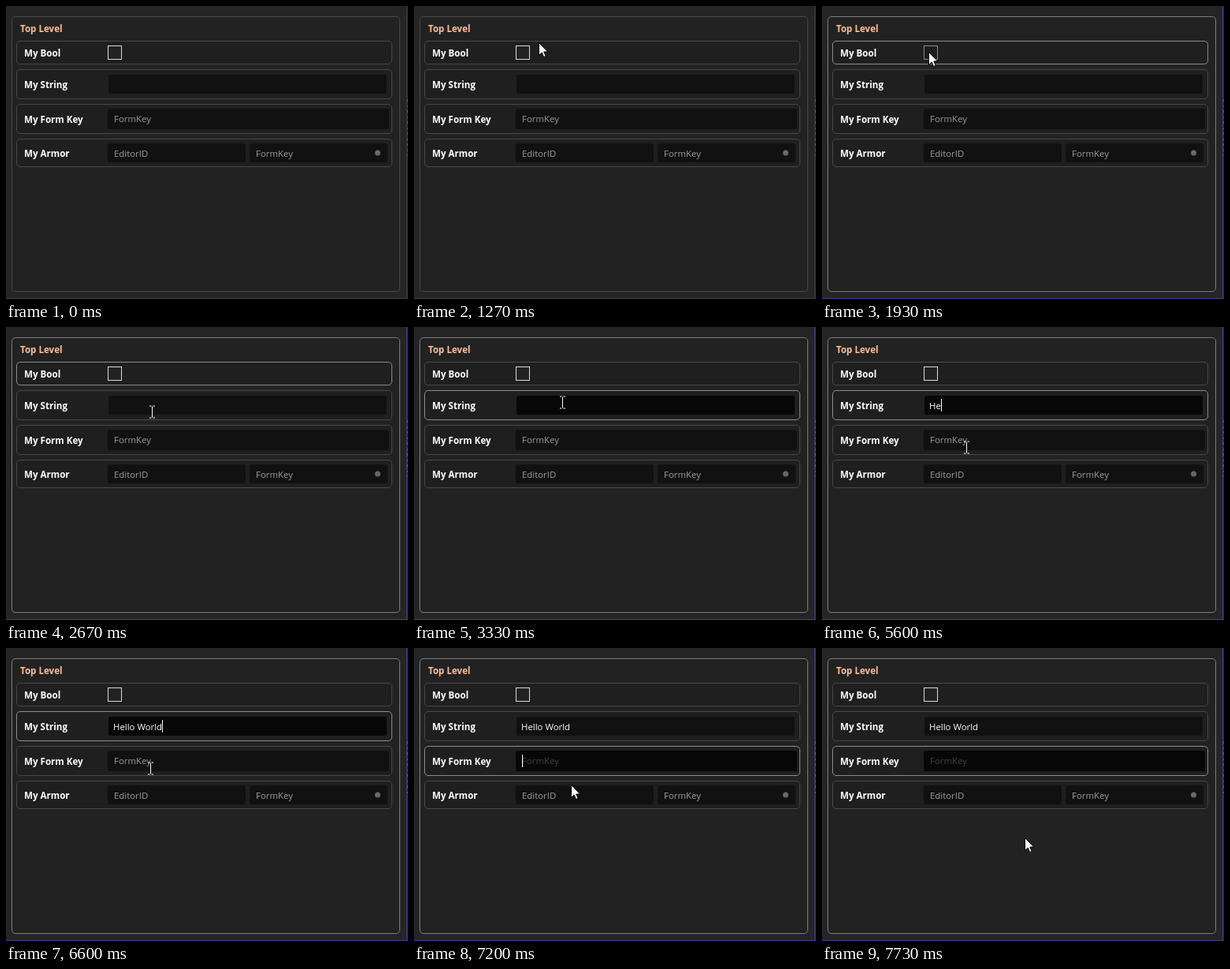
These frames come from a looping animation (510 by 371 pixels, 8000 ms). An HTML page:

```html
<!DOCTYPE html>
<html lang="en">
<head>
<meta charset="utf-8">
<title>Settings form</title>
<style>
  html, body { margin: 0; width: 100%; height: 100%; overflow: hidden; background: #252525; }
  svg { display: block; width: 510px; height: 371px; font: 11.4px "Open Sans", "Noto Sans", sans-serif; }
  text { white-space: pre; }
  .label { font-size: 11.6px; font-weight: 700; fill: #fff; }
  .title { fill: #fdbe98; }
  .panel, .row { stroke: #484848; }
  .panel { fill: #222; }
  .row { fill: #1f1f1f; }
  .active .panel { stroke: #7c7c7c; }
  .row.focus { stroke: #8c8c8c; }
  .field { fill: #111; }
  .field.focus { fill: #070707; }
  .hint { fill: #9c9c9c; }
  .hint.focus { fill: #414141; }
  .box { fill: #222; stroke: #dadada; }
  .box.hover { fill: #1c1c1c; stroke: #8a8a8a; }
  .frame { fill: none; stroke: #3c3c3c; }
  .active .frame { stroke: #493d91; }
  .hidden { display: none; }
</style>
</head>
<body>
<svg id="stage" viewBox="0 0 510 371">
  <path class="frame" d="M508.5 0V370.5H0"/>
  <path d="M509.5 118V189" stroke="#555" stroke-dasharray="3 5 2 4" fill="none"/>
  <rect class="panel" x="7.5" y="13.5" width="492" height="348" rx="4.5"/>
  <text class="label title" x="18" y="33">Top Level</text>

  <rect class="row" id="boolRow" x="13.5" y="44.5" width="476" height="29" rx="4.5"/>
  <rect class="row" id="stringRow" x="13.5" y="80.5" width="476" height="37" rx="4.5"/>
  <rect class="row" id="keyRow" x="13.5" y="124.5" width="476" height="37" rx="4.5"/>
  <rect class="row" x="13.5" y="168.5" width="476" height="35" rx="4.5"/>
  <g class="label">
    <text x="23" y="64">My Bool</text>
    <text x="23" y="104">My String</text>
    <text x="23" y="148">My Form Key</text>
    <text x="23" y="191">My Armor</text>
  </g>

  <rect class="box" id="box" x="129.5" y="50.5" width="17" height="17"/>
  <path id="check" d="M132.5 58.5L136.5 62.3L143.5 54.5" fill="none" stroke="#e4e4e4" stroke-width="1.5"/>

  <rect class="field" id="stringField" x="130" y="87" width="353" height="24" rx="2.5"/>
  <rect class="field" id="keyField" x="129" y="130" width="357" height="26" rx="2.5"/>
  <rect class="field" x="129" y="174" width="175" height="24" rx="2.5"/>
  <rect class="field" x="309" y="174" width="175" height="24" rx="2.5"/>
  <text id="typed" x="136" y="104" fill="#fff"></text>
  <text class="hint" id="keyHint" x="137" y="147">FormKey</text>
  <text class="hint" x="137" y="191">EditorID</text>
  <text class="hint" x="317" y="191">FormKey</text>
  <circle cx="471.5" cy="186" r="3.5" fill="#686868"/>
  <rect id="caret" width="1" height="16" fill="#fff"/>

  <g id="pointer">
    <path id="arrow" d="M.5 .5V16.5L4.2 13L6.6 18.5L9.2 17.4L6.8 12H11.7Z" fill="#fff" stroke="#000"/>
    <path id="beam" d="M-3 -7H-.5M1.5 -7H4M.5 -6.5V7.5M-3 8H-.5M1.5 8H4" fill="none" stroke="#fff"/>
  </g>
</svg>
<script>
  const LOOP = 8000, TICK = 1000 / 15;
  const ids = ["stage", "boolRow", "stringRow", "keyRow", "box", "check", "stringField",
    "keyField", "typed", "keyHint", "caret", "pointer", "arrow", "beam"];
  const ui = Object.fromEntries(ids.map(id => [id, document.getElementById(id)]));

  // Pointer stops: tick, x, y
  const stops = [
    [13, 499, 348], [16, 290, 150], [19, 158, 46], [20, 158, 46], [25, 135, 58], [36, 135, 58],
    [39, 178, 111], [42, 198, 99], [45, 199, 96], [49, 199, 96], [50, 188, 95],
    [53, 183, 152], [106, 183, 152], [111, 222, 205], [116, 257, 240]
  ];

  // Typing: tick, content of the text field
  const edits = [
    [0, ""], [61, "H"], [63, "HY"], [64, "HYe"], [65, "HYel"], [67, "HYelo"],
    [72, "HYel"], [74, "HYe"], [76, "HY"], [78, "H"],
    [83, "He"], [85, "Hel"], [86, "Hell"], [88, "Hello"], [91, "Hello "],
    [93, "Hello W"], [95, "Hello Wo"], [96, "Hello Wor"], [97, "Hello Worl"], [99, "Hello World"]
  ];

  const within = (t, from, to) => t >= from && t < to;
  const show = (el, on) => el.classList.toggle("hidden", !on);
  const hit = (x, y, el) => {
    const [left, top, w, h] = ["x", "y", "width", "height"].map(a => +el.getAttribute(a));
    return within(x, left, left + w) && within(y, top, top + h);
  };
  const fields = [...document.querySelectorAll(".field")];

  function pointerAt(t) {
    const next = stops.findIndex(s => s[0] > t);
    if (next < 0) return stops[stops.length - 1].slice(1);
    if (next === 0) return [-50, -50];
    const [t0, x0, y0] = stops[next - 1], [t1, x1, y1] = stops[next];
    const k = (t - t0) / (t1 - t0);
    return [Math.round(x0 + (x1 - x0) * k), Math.round(y0 + (y1 - y0) * k)];
  }

  function render(t) {
    const onString = within(t, 42, 106), onKey = t >= 106;
    ui.stage.classList.toggle("active", t >= 29);
    ui.boolRow.classList.toggle("focus", within(t, 29, 42));
    for (const el of [ui.stringRow, ui.stringField]) el.classList.toggle("focus", onString);
    for (const el of [ui.keyRow, ui.keyField, ui.keyHint]) el.classList.toggle("focus", onKey);
    show(ui.check, within(t, 30, 35));

    ui.typed.textContent = edits.filter(e => e[0] <= t).pop()[1];
    const length = ui.typed.textContent ? ui.typed.getComputedTextLength() : 0;
    ui.caret.setAttribute("x", onKey ? 137 : Math.round(136 + length));
    ui.caret.setAttribute("y", onKey ? 135 : 91);
    show(ui.caret, within(t, 42, 50) || within(t, 58, 114));

    const [x, y] = pointerAt(t);
    const overField = fields.some(f => hit(x, y, f));
    ui.pointer.setAttribute("transform", `translate(${x} ${y})`);
    show(ui.arrow, !overField);
    show(ui.beam, overField);
    ui.box.classList.toggle("hover", hit(x, y, ui.box));
  }

  let last = -1;
  function loop() {
    const tick = Math.floor((performance.now() % LOOP + 4) / TICK) % 120;
    if (tick !== last) render(last = tick);
    requestAnimationFrame(loop);
  }
  loop();
</script>
</body>
</html>
```
